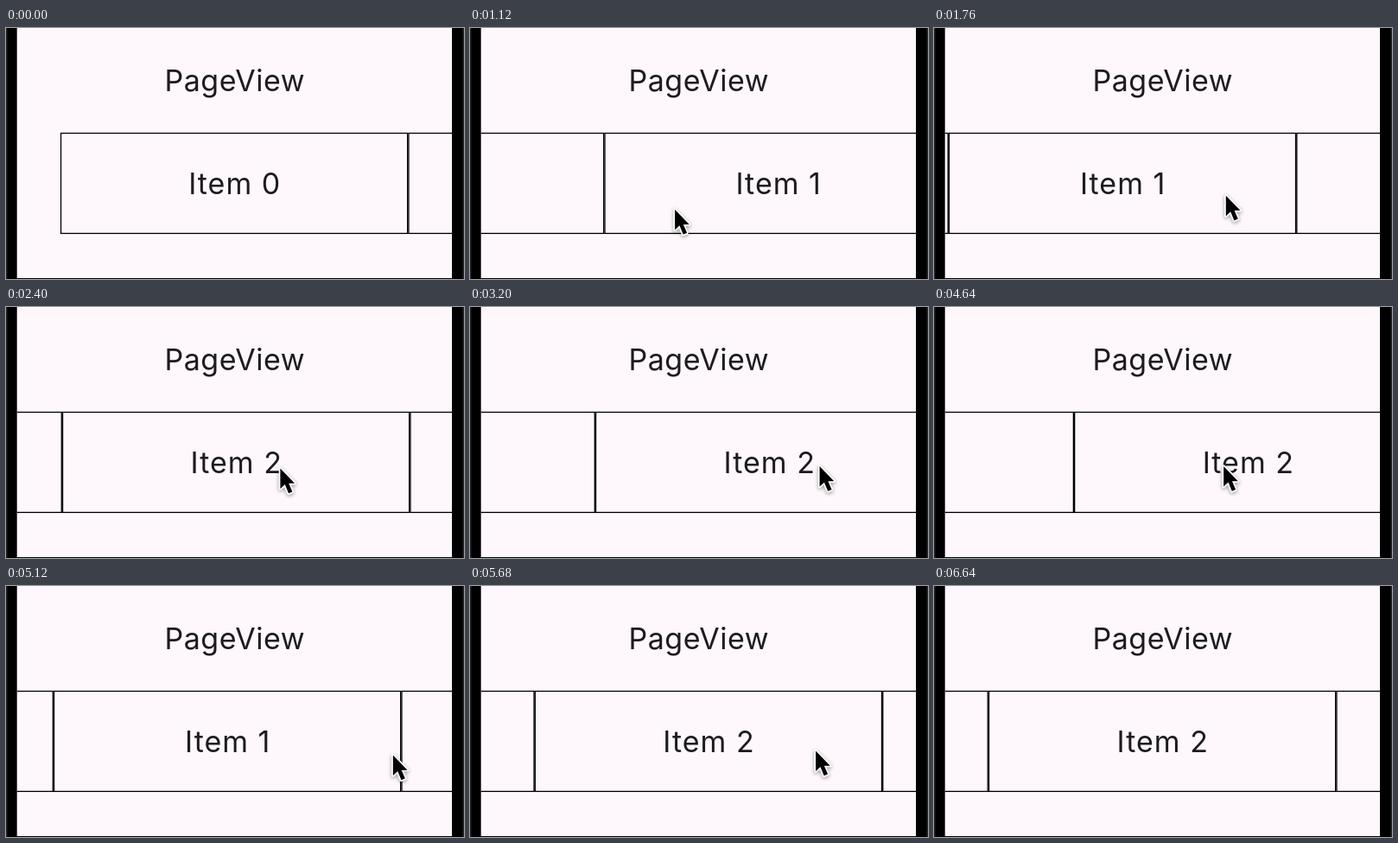
Recreate the animation shown at these times as an HTML page with a canvas. Size 530 by 290 pixels, loop 7600 ms.

```html
<!DOCTYPE html>
<html lang="en">
<head>
<meta charset="utf-8">
<title>PageView</title>
<style>
  html, body { margin: 0; width: 100%; height: 100%; overflow: hidden; background: #000; }
  canvas { display: block; }
</style>
</head>
<body>
<canvas id="stage" width="530" height="290"></canvas>
<script>
const ctx = document.getElementById('stage').getContext('2d');
const LOOP = 7600, STEP = 80;
const VIEW = { left: 12.7, right: 516, bottom: 289 };
const PAGE = 402.4, FIRST = 62.9;
const BOX = { top: 120.9, height: 117.1, line: 1.3 };
const POINTER = { shown: 160, hidden: 6640 };

// Each drag pulls the pages by some pixels, then lets them spring to a page
const gestures = [
  { start: 700, release: 948, pull: 98, from: 0, to: 1 },
  { start: 1650, release: 1812, pull: 100, from: 1, to: 2 },
  { start: 2500, release: 3320, pull: -112.6, from: 2, to: 2 },
  { start: 4400, release: 4760, pull: -223, from: 2, to: 1 },
  { start: 5300, release: 5360, pull: 110, from: 1, to: 2 }
];

// Where the hand turns: [time, x, y]
const turns = [
  [160, 431, 217], [640, 366, 195], [1080, 235, 210], [1650, 385, 192],
  [1900, 270, 196], [2480, 320, 186], [3280, 407, 184], [4400, 236, 184],
  [4800, 389, 184], [5240, 461, 198], [5440, 350, 198], [5720, 403, 190],
  [6560, 395, 195]
];

// Overdamped spring with an initial speed, in px and px/s
function spring(gap, speed, seconds) {
  const slow = 9.07, fast = 22.03;
  const a = (fast * gap + speed) / (fast - slow);
  return a * Math.exp(-slow * seconds) + (gap - a) * Math.exp(-fast * seconds);
}

function scrollAt(t) {
  const g = gestures.filter(({ start }) => start <= t).pop();
  if (!g) return 0;
  const origin = g.from * PAGE, target = g.to * PAGE;
  const duration = g.release - g.start;
  if (t < g.release) return origin + g.pull * ((t - g.start) / duration) ** 2;
  const speed = -2000 * g.pull / duration;
  const gap = spring(target - origin - g.pull, speed, (t - g.release) / 1000);
  return Math.abs(gap) < 0.6 ? target : target - gap;
}

function pointerAt(t) {
  const next = turns.findIndex(([time]) => time > t);
  if (next < 0) return turns[turns.length - 1].slice(1);
  const [t0, x0, y0] = turns[next - 1], [t1, x1, y1] = turns[next];
  const k = (t - t0) / (t1 - t0), ease = k * k * (3 - 2 * k);
  return [x0 + (x1 - x0) * ease, y0 + (y1 - y0) * ease];
}

function rect(color, x, y, w, h) {
  ctx.fillStyle = color;
  ctx.fillRect(x, y, w, h);
}

function label(text, x, baseline, spacing) {
  ctx.fillStyle = '#1d1b20';
  ctx.font = '34px Inter, sans-serif';
  ctx.letterSpacing = spacing;
  ctx.textAlign = 'center';
  ctx.fillText(text, x, baseline);
}

function drawItem(index, offset) {
  const x = FIRST + index * PAGE - offset, inset = BOX.line / 2;
  if (x > VIEW.right || x + PAGE < VIEW.left) return;
  ctx.strokeStyle = '#000';
  ctx.lineWidth = BOX.line;
  ctx.strokeRect(x + inset, BOX.top + inset, PAGE - BOX.line, BOX.height - BOX.line);
  label('Item ' + index, x + PAGE / 2 + 0.6, 191.7, '1px');
}

const arrow = new Path2D('M0 0V23.5L5.4 18.6L9.6 28.8L14 26.9L9.8 17.2H16.7Z');

function drawPointer(t) {
  if (t < POINTER.shown || t >= POINTER.hidden) return;
  ctx.save();
  ctx.translate(...pointerAt(t));
  ctx.lineJoin = 'round';
  ctx.lineWidth = 3.4;
  ctx.strokeStyle = '#fff';
  ctx.shadowColor = 'rgba(0, 0, 0, 0.4)';
  ctx.shadowBlur = 4;
  ctx.shadowOffsetY = 1.5;
  ctx.stroke(arrow);
  ctx.shadowColor = 'transparent';
  ctx.fillStyle = '#000';
  ctx.fill(arrow);
  ctx.restore();
}

function draw(t) {
  const width = VIEW.right - VIEW.left;
  rect('#000', 0, 0, 530, 290);
  rect('#262624', 0, 0, 1.5, 290);
  rect('#262624', 528.5, 0, 1.5, 290);
  rect('#fef8fc', VIEW.left, 0, width, VIEW.bottom);
  label('PageView', 264.8, 72.8, '0.5px');

  ctx.save();
  ctx.beginPath();
  ctx.rect(VIEW.left, 0, width, VIEW.bottom);
  ctx.clip();
  const offset = scrollAt(t);
  for (let i = 0; i < 5; i++) drawItem(i, offset);
  ctx.restore();
  drawPointer(t);
}

const begin = performance.now();
function tick() {
  const t = (performance.now() - begin) % LOOP;
  draw(Math.floor(t / STEP) * STEP);
  requestAnimationFrame(tick);
}
tick();
</script>
</body>
</html>
```
